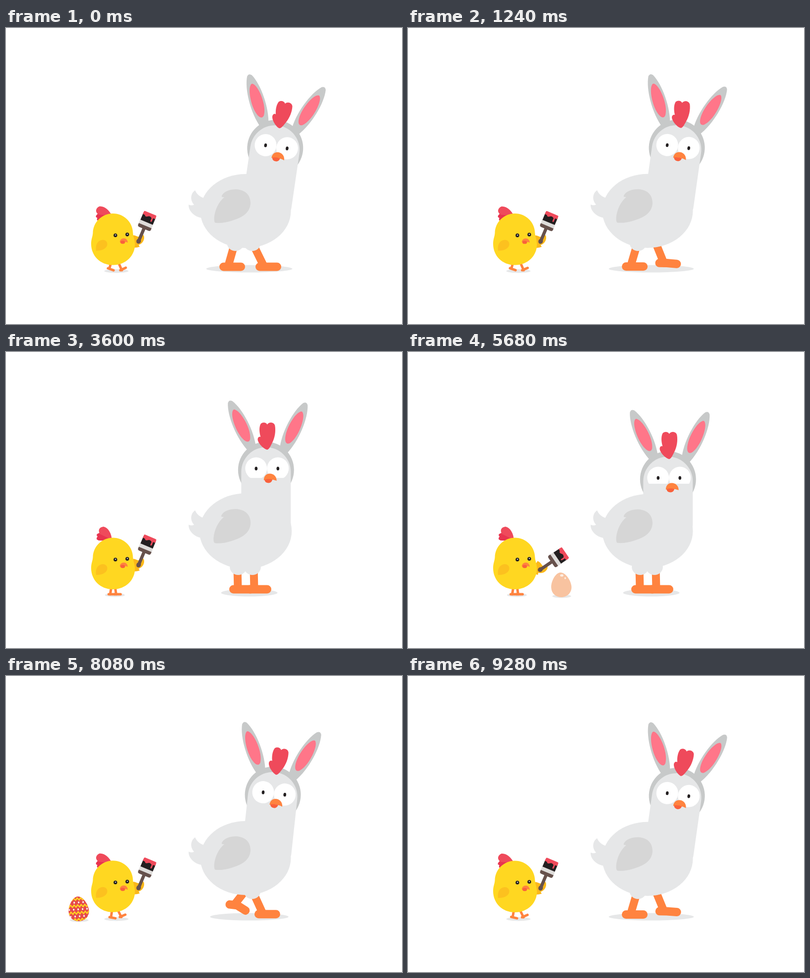
Recreate the animation shown at these times as an HTML page with a canvas. Size 800x600 px, loop 9320 ms.

```html
<!DOCTYPE html>
<html lang="en">
<head>
<meta charset="utf-8">
<title>Chick and hen</title>
<style>
html, body { margin: 0; width: 100%; height: 100%; overflow: hidden; background: #fff; }
canvas { display: block; width: 800px; height: 600px; }
</style>
</head>
<body>
<canvas id="stage" width="800" height="600"></canvas>
<script>
const ctx = document.getElementById('stage').getContext('2d');
const LOOP = 9320, STEP = 40, PI = Math.PI, RAD = PI / 180;
const GREY = '#e6e7e8', HOOD = '#c7c9c9', ORANGE = '#ff833f', TONGUE = '#f9613c';
const RED = '#ef4a5b', INK = '#231f20', BROWN = '#66514c';

const shape = {
  tail: 'M382 329C386 338 392 342 400 345L420 370L396 385C380 383 368 370 369 358Q375 361 380 358C372 350 372 336 382 329Z',
  wing: 'M436 340C440 331 452 327 465 327C485 328 494 340 494 355C493 376 475 385 455 391Q440 396 424 395Q420 395 420.5 385C422 368 430 352 441 343Q434 343 436 340Z',
  ear: 'M-8 4C-20 -30 -17 -80 -5 -103Q0 -109 5 -103C17 -80 20 -30 8 4Z',
  earInner: 'M-5 -18C-16 -35 -12 -75 -3.5 -84Q0 -88.5 3.5 -84C12 -75 16 -35 5 -18Q0 -12 -5 -18Z',
  comb: 'M2 -38C-6 -40 -19 -54 -16.5 -61Q-15 -65 -11 -64C-14 -74 -14 -84 -11 -90C-8 -94 0 -94 2.5 -89C6 -95 16 -94 18 -87C20 -76 18 -62 12 -51C9 -45 6 -38 2 -38Z',
  beak: 'M-4.5 24C-4.5 5 21.5 7 21.5 25Q9 20 -4.5 24Z',
  henTongue: 'M-3 23Q5 20.5 13 22.5Q11 29.5 5 29.5Q-2 29.5 -3 23Z',
  chick: 'M216 376.5C238 376.5 256 394 256.5 416C257 424 260 428 260.5 438C261 462 242 481 216 481C190 481 172 462 172 438C172 428 175 424 175.5 416C176 394 194 376.5 216 376.5Z',
  chickWing: 'M182 452C180 440 185 431 195 430C203 430 206 436 204 442C201 449 192 452 182 452Z',
  chickBeak: 'M230 435C230 424 246 424 246 435.5Q241 433 230 435Z',
  tuftTop: 'M214 381C213 368 207 356 197 354C188 355 185 362 190 369Z',
  tuftLow: 'M214 379C206 370 196 366 188 367Q180 370 185 374Q180 379 187 382L214 383Z',
  arm: 'M254 420C262 418 266 424 270 422C274 416 280 417 279 426C278 434 272 438 268 439L270 443Q262 446 254 444Z',
  drip: 'M-13.5 -59.5Q-13.5 -61.5 -11.5 -61.5H11.5Q13.5 -61.5 13.5 -59.5V-54H9V-47Q7 -44 6 -47V-53Q1 -57 -3 -53Q-7 -50 -9 -54H-13.5Z',
  egg: 'M0 -25C10 -25 20.5 -8 20.5 5C20.5 17 11 25 0 25C-11 25 -20.5 17 -20.5 5C-20.5 -8 -10 -25 0 -25Z'
};
for (const k in shape) shape[k] = new Path2D(shape[k]);

/* ---------- timing ---------- */
const part = (t, a, b) => Math.min(1, Math.max(0, (t - a) / (b - a)));
const ease = u => (1 - Math.cos(PI * u)) / 2;
const ramp = (t, a, b) => ease(part(t, a, b));
const hump = (t, a, b) => Math.sin(PI * part(t, a, b));
const mix = (a, b, w) => a + (b - a) * w;

/* ---------- drawing ---------- */
function fill(path, color) { ctx.fillStyle = color; ctx.fill(path); }
function oval(x, y, rx, ry, color) {
  ctx.fillStyle = color;
  ctx.beginPath();
  ctx.ellipse(x, y, rx, ry, 0, 0, 2 * PI);
  ctx.fill();
}
function line(width, color, ...points) {
  ctx.strokeStyle = color;
  ctx.lineWidth = width;
  ctx.lineCap = ctx.lineJoin = 'round';
  ctx.beginPath();
  for (const [x, y] of points) ctx.lineTo(x, y);
  ctx.stroke();
}
function box(x, y, w, h, r, color) {
  ctx.fillStyle = color;
  ctx.beginPath();
  ctx.roundRect(x, y, w, h, r);
  ctx.fill();
}
function clipBox(x, y, w, h) {
  ctx.beginPath();
  ctx.rect(x, y, w, h);
  ctx.clip();
}
function at(x, y, deg, draw) {
  ctx.save();
  ctx.translate(x, y);
  ctx.rotate(deg * RAD);
  draw();
  ctx.restore();
}
function about(x, y, deg, draw) {
  at(x, y, deg, () => { ctx.translate(-x, -y); draw(); });
}
const along = ([x, y], len, deg) => [x + len * Math.cos(deg * RAD), y + len * Math.sin(deg * RAD)];

/* ---------- hen ---------- */

// Even steps are on the ground, odd ones swing; w blends from standing to walking.
function henLeg(phase, w, restX) {
  const u = phase % 1, arc = Math.sin(PI * u), bend = arc * arc * w;
  let x, y, hip, raise = 0, heelTurn = 0, toeTurn = 0;
  if (phase % 2 < 1) {
    x = 527.5 - 73 * ease(u ** 1.25);
    y = 484 - 2.5 * arc;
    hip = 500 - 39 * ease(u * u);
  } else {
    x = 454.5 + 73 * u;
    y = 484 - 38 * arc;
    hip = 461 + 39 * u + 24 * arc;
    raise = 18 * Math.sqrt(arc) * w;
    heelTurn = 25 * bend;
    toeTurn = 125 * bend;
  }
  hip = mix(restX - 7, hip, w);
  const ankle = [mix(restX, x, w), mix(481, y, w)];
  line(16, ORANGE, [hip, 440], along(ankle, -6, heelTurn));
  line(17, ORANGE, along(ankle, -15, heelTurn), ankle, along(ankle, 20, toeTurn));
  oval(mix(hip, 480, .13), 436 - raise, 17, 16, GREY);
}

function henHead(squeeze, lid, flop) {
  oval(0, 3, 56.5, 57, HOOD);
  for (const [x, y, tilt] of [[-29, -41, -25], [36, -37, 25]]) {
    at(x, y, tilt, () => {
      fill(shape.ear, HOOD);
      fill(shape.earInner, '#ff7689');
    });
  }
  box(-50, -43, 100, 176 - squeeze, [50, 50, 14, 14], GREY);
  about(2, -38, flop, () => fill(shape.comb, RED));
  ctx.save();
  clipBox(-60, -40, 120, 40 + lid);
  for (const x of [-20, 24]) oval(x, 0, 22, 22.5, '#fff');
  ctx.restore();
  for (const x of [-20, 24]) oval(x, .3, 2.8, 3.8, INK);
  fill(shape.beak, ORANGE);
  fill(shape.henTongue, TONGUE);
}

function hen(t) {
  const phase = t < 5000
    ? t / 640 - Math.max(0, t - 2160) / 1620 - (t > 3350 ? (t - 3350) * (1 / 640 - 1 / 1620) : 0)
    : mix(4.5, 8, part(t, 6950, LOOP));
  const w = 1 - ramp(t, 2750, 3350) + ramp(t, 6950, 7300);
  const passing = mix(1, Math.sin(PI * phase) ** 2, w);
  const squeeze = 5 * ramp(t, 3300, 3600) + 19 * ramp(t, 3600, 3880) - 24 * ramp(t, 6400, 7050);
  const lid = squeeze < 5 ? 24 - squeeze : 21 - .37 * squeeze;
  const flop = 5 - 10 * ramp(t, 200, 1200) + 5 * ramp(t, 1240, 2160) + 5 * ramp(t, 6950, 7700);
  const puff = 1 + .02 * hump(t, 3400, 3880) + .085 * hump(t, 4080, 4440) - .02 * hump(t, 4440, 4640);

  oval(491.5, 488, 87 - 30 * passing, 7.5, GREY);
  henLeg(phase + 1, w, 474.5);
  henLeg(phase, w, 507.5);

  ctx.save();
  ctx.translate(0, -8 * passing);
  fill(shape.tail, GREY);
  at(525.3, 370, 8.3 * (1 - passing), () => {
    ctx.translate(0, squeeze - 131);
    henHead(squeeze, lid, flop);
  });
  at(484, 371, 0, () => {
    ctx.scale(puff, puff);
    oval(0, 0, 91.5, 75, GREY);
    ctx.translate(-484, -371);
    fill(shape.wing, '#d6d6d6');
  });
  ctx.restore();
}

/* ---------- egg ---------- */
function decoration() {
  ctx.fillStyle = '#e64b4b';
  ctx.fillRect(-22, -26, 44, 52);
  for (let y = -20; y < 26; y += 14) {
    const teeth = Array.from({ length: 14 }, (_, i) => [i * 3.6 - 23, y + (i % 2 ? 2.4 : -2.4)]);
    line(2.4, '#ffd51f', ...teeth);
    for (let x = -17; x < 20; x += 9) oval(x + y % 4, y + 7, 1.6, 2, '#fff3ee');
  }
}

function egg(t) {
  if (t < 4320 || t > 8860) return;
  const fall = part(t, 4320, 4560);
  const roll = 95 * (1 - part(t, 4320, 5320)) ** 2;
  // Left behind: gathers speed over 700 ms, then keeps it.
  const go = Math.max(0, t - 7000), gain = Math.min(go, 700);
  const x = 309.5 + roll - .223 * (go - gain + gain * gain / 1400);
  if (fall > .5) oval(x + 1, 495, 19, 3.5, GREY);
  at(x, 400 + 72 * fall * fall, roll * 3.8 - 4, () => {
    const size = .7 + .3 * fall, painted = 52 * ramp(t, 5880, 6440);
    ctx.scale(size, size);
    fill(shape.egg, '#f8c3a0');
    oval(2.5, -19, 3.4, 2.4, '#fdeee3');
    oval(9, -13, 1.6, 2, '#fdeee3');
    if (!painted) return;
    ctx.clip(shape.egg);
    clipBox(-22, -26, 44, painted);
    decoration();
  });
}

/* ---------- chick ---------- */
function chickLeg(phase, w, restX) {
  const u = phase % 1;
  let x, y, turn;
  if (phase % 2 < 1) {
    x = 231 - 25 * u;
    y = 491 - 4 * u ** 4;
    turn = 20 * u ** 4 - 25 * (1 - u) ** 6;
  } else {
    x = 206 + 25 * ease(u);
    y = 487 + 4 * u - 5 * Math.sin(PI * u);
    turn = 20 - 45 * ease(u);
  }
  const heel = [mix(restX, x, w), mix(491, y, w)];
  line(5, ORANGE, [80 + heel[0] * .64, 477], [heel[0] + 3, heel[1]]);
  line(5, ORANGE, heel, along(heel, 12, turn * w));
}

function brush() {
  line(6.5, BROWN, [0, 0], [0, -30]);
  oval(0, 0, 4.6, 5.2, BROWN);
  box(-14, -37, 28, 10, 4, BROWN);
  box(-14, -41.5, 28, 7.5, 0, '#dedcda');
  box(-13.5, -57, 27, 15.5, 0, INK);
  fill(shape.drip, RED);
}

function chick(t) {
  const phase = t < 5000
    ? mix(0, 5.25, part(t, 0, 2160)) + 1.25 * part(t, 2160, 3000)
    : mix(6.5, 12, part(t, 7140, LOOP));
  const w = 1 - ramp(t, 1700, 3000) + ramp(t, 7000, 7400);
  const dy = w * (2.4 * Math.sin(2 * PI * phase) - .6);
  const tuft = -22 + 26 * ramp(t, 1240, 2100) - 4 * ramp(t, 2160, 2900) - 22 * ramp(t, 6950, 7400);
  const dab = 14 * hump(t, 5880, 6440) * Math.sin((t - 5880) / 45);
  const stroke = 66 * (ramp(t, 5200, 6160) - ramp(t, 6400, 6900)) + dab;
  const reach = Math.min(stroke, 33);

  oval(220 + 3 * w, 492.7, 20 + 4.5 * w, 3.7, GREY);
  chickLeg(phase + 1, w, 207.5);
  chickLeg(phase, w, 219.5);

  at(reach * .06, 1.6 * dy + 1.5 * w + reach * .1, 0, () => {
    about(256, 430, stroke, () => {
      fill(shape.arm, '#fbb81a');
      at(268, 431.5, 22.8, brush);
    });
  });
  at(0, dy, 0, () => {
    about(214, 381, tuft, () => {
      fill(shape.tuftLow, '#e8344f');
      fill(shape.tuftTop, RED);
    });
    fill(shape.chick, '#ffd721');
    fill(shape.chickWing, '#fcc11f');
    for (const [x, y] of [[221, 420.8], [245, 419.2]]) {
      oval(x, y, 3.7, 3.8, INK);
      oval(x + .2, y - .6, 1.1, 1.1, '#fff');
    }
    fill(shape.chickBeak, ORANGE);
    oval(235.8, 434.8, 4.6, 3.2, TONGUE);
  });
}

const start = performance.now();
function frame() {
  const t = Math.floor((performance.now() - start) % LOOP / STEP) * STEP;
  ctx.fillStyle = '#fff';
  ctx.fillRect(0, 0, 800, 600);
  egg(t);
  hen(t);
  chick(t);
  requestAnimationFrame(frame);
}
frame();
</script>
</body>
</html>
```
